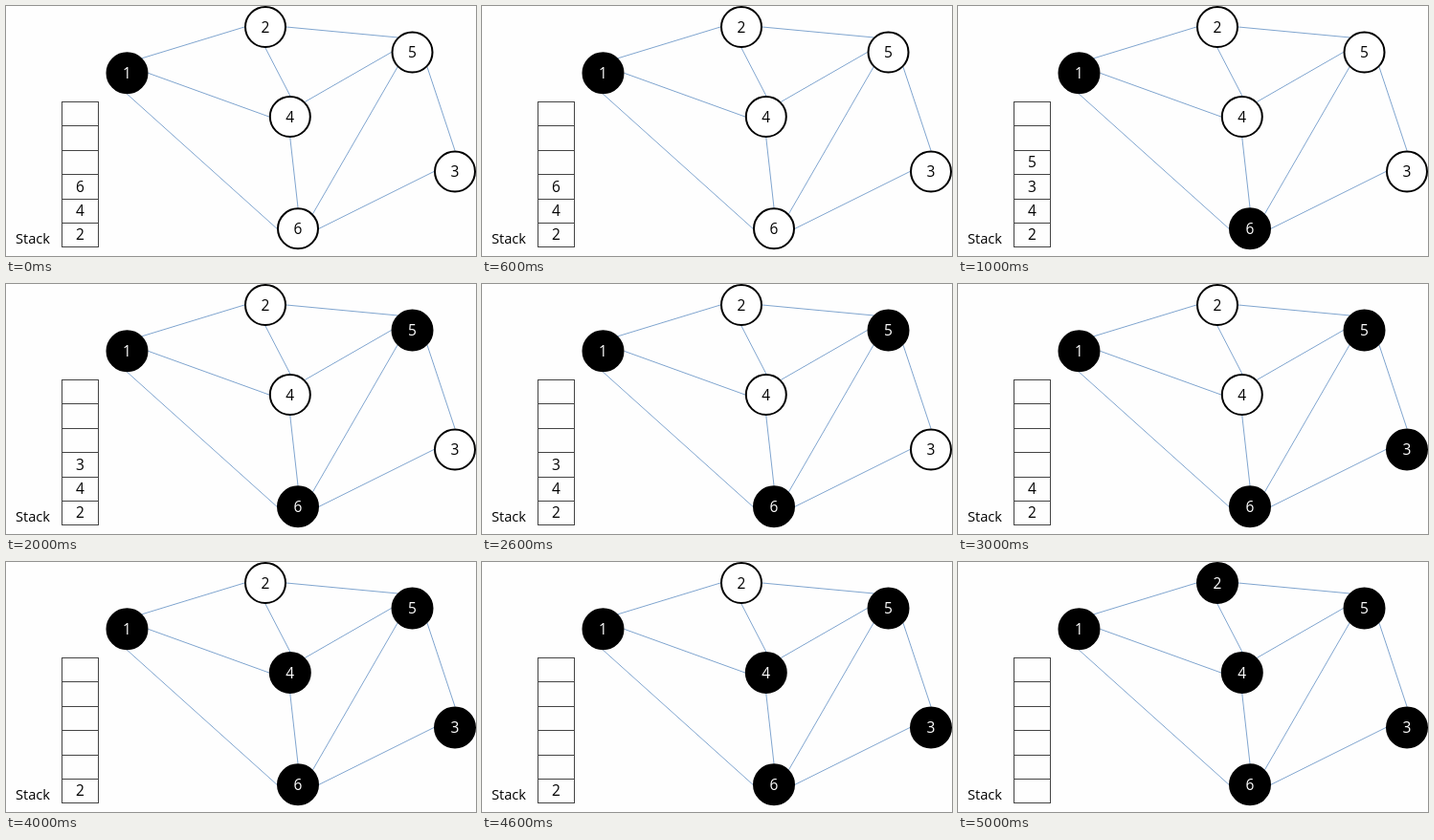
An HTML page for the animation above (6000 ms loop, 491 by 262 pixels).

```html
<!DOCTYPE html>
<html lang="en">
<head>
<meta charset="utf-8">
<title>Depth-first search with a stack</title>
<style>
  html, body { margin: 0; width: 100%; height: 100%; overflow: hidden; background: #fefefe; }
  svg { display: block; width: 491px; height: 262px; }
  text { font: 14.67px "Open Sans", "Noto Sans", sans-serif; fill: #000; }
  .digit { font-size: 15.5px; text-anchor: middle; }
  .edge { stroke: #4a7ebb; stroke-width: 0.7; }
  .cell { fill: none; stroke: #444; stroke-width: 1; }
  .node circle { fill: #fff; stroke: #000; stroke-width: 2; }
  .node.visited circle { fill: #000; }
  .node.visited text { fill: #fff; }
</style>
</head>
<body>
<svg viewBox="0 0 491 262"></svg>
<script>
const STEP = 1000;
const RADIUS = 22;
const ROWS = 6;
const ROW_HEIGHT = 25.4;

const nodes = {
  1: [126.5, 70.3], 2: [271, 22], 3: [469, 173.5],
  4: [296.8, 116], 5: [424.5, 48.5], 6: [305, 233.3]
};

// Every edge joins compass points on the rims of two nodes.
const edges = [
  "1NE 2W", "1E 4W", "1S 6W", "2E 5NW", "2S 4N",
  "4NE 5W", "5SW 6NE", "5SE 3N", "6E 3W", "4S 6N"
].map(edge => edge.split(" "));
const compass = ["E", "SE", "S", "SW", "W", "NW", "N", "NE"];

const svg = document.querySelector("svg");

function add(parent, tag, attrs, label = "") {
  const el = document.createElementNS("http://www.w3.org/2000/svg", tag);
  for (const key in attrs) el.setAttribute(key, attrs[key]);
  el.textContent = label;
  return parent.appendChild(el);
}

function rimPoint([id, ...direction]) {
  const angle = compass.indexOf(direction.join("")) * Math.PI / 4;
  const [x, y] = nodes[id];
  return [x + RADIUS * Math.cos(angle), y + RADIUS * Math.sin(angle)];
}

// Visit the top of the stack, then push its new neighbours in ascending order.
function search(first) {
  const stack = [first], seen = new Set(stack), visited = [], steps = [];
  while (stack.length) {
    const id = stack.pop();
    visited.push(id);
    const neighbours = edges.map(([a, b]) => [a[0], b[0]])
      .filter(pair => pair.includes(id))
      .map(([a, b]) => a === id ? b : a)
      .sort();
    for (const next of neighbours) {
      if (seen.has(next)) continue;
      seen.add(next);
      stack.push(next);
    }
    steps.push({ visited: [...visited], stack: [...stack] });
  }
  return steps;
}

for (const [from, to] of edges) {
  const [x1, y1] = rimPoint(from), [x2, y2] = rimPoint(to);
  add(svg, "line", { class: "edge", x1, y1, x2, y2 });
}

const groups = {};
for (const id in nodes) {
  const [cx, cy] = nodes[id];
  groups[id] = add(svg, "g", { class: "node" });
  add(groups[id], "circle", { cx, cy, r: RADIUS - 1 });
  add(groups[id], "text", { class: "digit", x: cx, y: cy + 5.5 }, id);
}

const rowLine = i => Math.round(100 + i * ROW_HEIGHT) + 0.5;
const slots = [];
for (let i = 0; i < ROWS; i++) {
  const top = rowLine(i), bottom = rowLine(i + 1);
  add(svg, "rect", { class: "cell", x: 58.5, y: top, width: 38, height: bottom - top });
  slots.unshift(add(svg, "text", { class: "digit", x: 77.5, y: bottom - 7.4 }));
}
add(svg, "text", { x: 10, y: 249 }, "Stack");

const steps = search("1");
let shown = -1;
function show(index) {
  if (index === shown) return;
  shown = index;
  const { visited, stack } = steps[index];
  for (const id in groups) groups[id].classList.toggle("visited", visited.includes(id));
  slots.forEach((slot, i) => { slot.textContent = stack[i] || ""; });
}

let start;
function tick(now) {
  start ??= now;
  show(Math.floor((now - start) / STEP) % steps.length);
  requestAnimationFrame(tick);
}
show(0);
requestAnimationFrame(tick);
</script>
</body>
</html>
```
